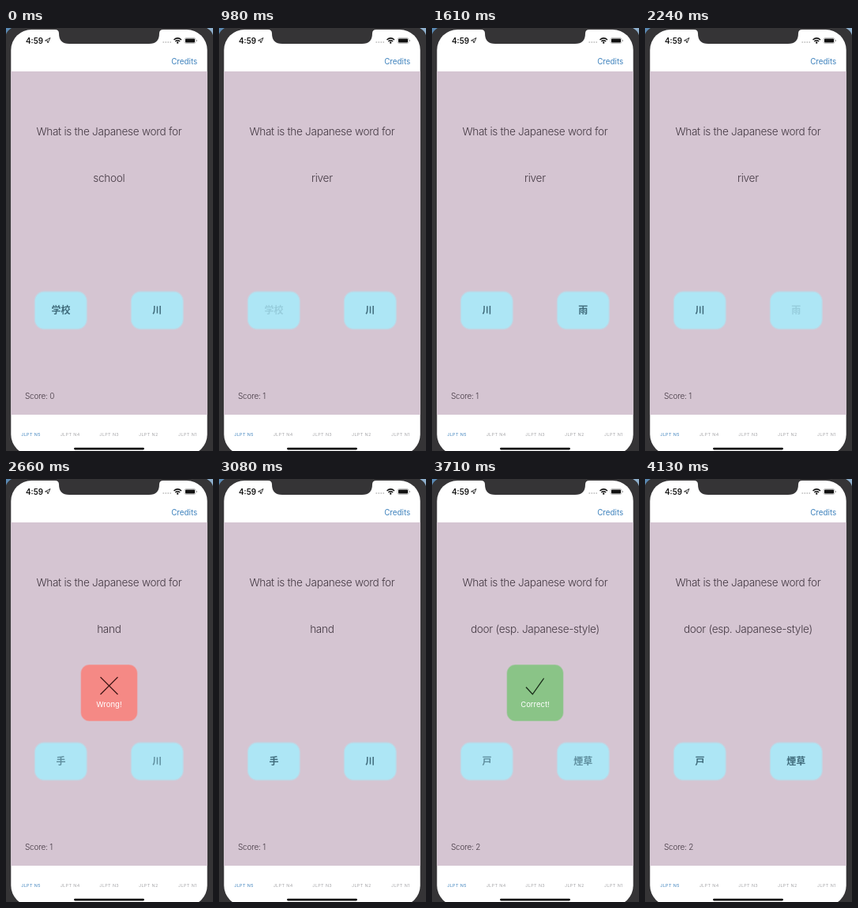
An HTML page for the animation above (4340 ms loop, 262 by 536 pixels).

```html
<!DOCTYPE html>
<html lang="ja">
<head>
<meta charset="utf-8">
<title>Japanese word quiz</title>
<style>
  html, body { margin: 0; width: 100%; height: 100%; overflow: hidden; background: #353436; }
  svg { display: block; width: 100vw; height: 100vh; }
  text { font-family: Inter, sans-serif; text-anchor: middle; }
  .prompt { font-size: 13.6px; font-weight: 300; letter-spacing: -.022em; fill: #443943; }
  .score { font-size: 10px; text-anchor: start; }
  .kanji { font: 700 12px "Noto Sans CJK JP", "Noto Sans CJK", sans-serif; fill: #3f6b7b; }
  .tab { font-size: 5.4px; letter-spacing: .4px; fill: #a5a5a8; }
  .tab.on { fill: #3e82bd; }
  .button { fill: #ade6f5; stroke: #c0d6e4; stroke-width: 1.3; }
  .mark { fill: none; stroke-width: 1.3; }
  .verdict { fill: #fff; font-size: 9.5px; }
</style>
</head>
<body>
<svg viewBox="0 0 262 536" preserveAspectRatio="none">
  <defs>
    <clipPath id="screen"><rect x="6.3" y="2" width="248.4" height="539" rx="26"/></clipPath>
  </defs>
  <rect width="262" height="536" fill="#353436"/>
  <path d="M0 0H7Q2 3 0 8Z" fill="#5b8ab4"/>
  <path d="M262 0H254Q260 3 262 9Z" fill="#8fb0cd"/>

  <g clip-path="url(#screen)">
    <rect width="262" height="541" fill="#fff"/>
    <rect y="55" width="262" height="435" fill="#d5c5d2"/>
    <path d="M62 0V2Q67 2 67 7Q67 20 80 20H181Q194 20 194 7Q194 2 199 2V0Z" fill="#353436"/>
    <text x="36" y="19.5" font-size="9.8" font-weight="600" fill="#111">4:59</text>
    <path d="M49.5 16L56 12.5L53 19L52.5 16Z" fill="none" stroke="#222" stroke-width=".9"/>
    <path d="M198.5 18H209" stroke="#bbb" stroke-width="1.5" stroke-dasharray="1.6 1.4"/>
    <g fill="none" stroke="#111" stroke-width="1.5">
      <path d="M212.5 15Q217.2 10.8 222 15M214.3 17Q217.2 14.5 220.2 17"/>
      <circle cx="217.2" cy="18.6" r=".5"/>
    </g>
    <rect x="226" y="12.5" width="14" height="7" rx="2" fill="none" stroke="#aaa" stroke-width=".7"/>
    <rect x="227" y="13.5" width="12" height="5" rx="1" fill="#111"/>
    <path d="M241.3 15V17" stroke="#999"/>
    <text x="225.7" y="45.5" font-size="9.8" fill="#3e82bd">Credits</text>

    <text class="prompt" x="130.4" y="136.4">What is the Japanese word for</text>
    <text class="prompt" id="word" x="130.4" y="195.4"></text>
    <text class="prompt score" id="score" x="24" y="469.5"></text>

    <rect class="button" x="36.4" y="334" width="65.8" height="47.5" rx="12"/>
    <rect class="button" x="158.4" y="334" width="65.8" height="47.5" rx="12"/>
    <g id="labels"></g>

    <g id="alert">
      <rect id="card" x="94.5" y="235" width="72" height="72" rx="11" stroke="#d5c5d2" stroke-opacity=".45" stroke-width="1.3"/>
      <path id="mark" class="mark"/>
      <text id="verdict" class="verdict" x="130.5" y="289"></text>
    </g>

    <g id="tabs"></g>
    <rect x="86" y="531.7" width="89" height="2.8" rx="1.4" fill="#111"/>
  </g>
</svg>
<script>
const LOOP = 4340, STEP = 70;

// Each round: when it starts, its content, when a button is tapped, and the alert shown on arrival.
const rounds = [
  { at: 0, word: 'school', options: ['学校', '川'], score: 0, tapAt: 840, tapped: 0 },
  { at: 980, word: 'river', options: ['川', '雨'], score: 1, tapAt: 2240, tapped: 1, alert: 'correct', closeAt: 1540 },
  { at: 2380, word: 'hand', options: ['手', '川'], score: 1, tapAt: 3360, tapped: 0, alert: 'wrong', closeAt: 2940 },
  { at: 3430, word: 'door (esp. Japanese-style)', options: ['戸', '煙草'], score: 2, alert: 'correct', closeAt: 4060 }
];
const alerts = {
  correct: { text: 'Correct!', fill: '#8ac487', ink: '#182b18', path: 'M119 263.8L127.3 272.8L141.6 252.5' },
  wrong: { text: 'Wrong!', fill: '#f58985', ink: '#421918', path: 'M119.5 251L141.5 273M141.5 251L119.5 273' }
};

const $ = id => document.getElementById(id);
const clamp = v => Math.max(0, Math.min(1, v));

function addText(parent, cls, x, y, text = '') {
  const el = document.createElementNS('http://www.w3.org/2000/svg', 'text');
  el.setAttribute('class', cls);
  el.setAttribute('x', x);
  el.setAttribute('y', y);
  el.textContent = text;
  return parent.appendChild(el);
}

[5, 4, 3, 2, 1].forEach((level, i) =>
  addText($('tabs'), i ? 'tab' : 'tab on', 31.5 + i * 49.6, 516.7, 'JLPT N' + level));

const labels = [69.5, 191.3].map(x => ({
  before: addText($('labels'), 'kanji', x, 362),
  now: addText($('labels'), 'kanji', x, 362)
}));

function drawAlert(round, t) {
  const alert = alerts[round.alert];
  if (!alert || t < round.at + STEP) {
    $('alert').style.opacity = 0;
    return 0;
  }
  const enter = 1 - (1 - clamp((t - round.at) / 210)) ** 2;
  const leave = clamp((t - round.closeAt + STEP) / 140);
  const scale = 1 + .48 * (1 - enter) - .08 * leave;
  const opacity = enter * (1 - leave);
  $('alert').style.opacity = opacity;
  $('alert').setAttribute('transform', `translate(130.5 271) scale(${scale}) translate(-130.5 -271)`);
  $('card').setAttribute('fill', alert.fill);
  $('mark').setAttribute('d', alert.path);
  $('mark').setAttribute('stroke', alert.ink);
  $('verdict').textContent = alert.text;
  return opacity;
}

function draw(t) {
  const index = rounds.findLastIndex(r => t >= r.at);
  const round = rounds[index], previous = rounds[index - 1];
  $('word').textContent = round.word;
  $('score').textContent = 'Score: ' + round.score;

  const dim = 1 - .3 * drawAlert(round, t);
  // Old labels fade out first, then the new ones fade in.
  const swap = previous ? clamp((t - round.at) / 140) : 1;
  const fadeIn = clamp(2 * swap - 1);
  const pressed = (r, side) => r.tapped === side && t >= r.tapAt ? .2 : 1;
  labels.forEach(({ before, now }, side) => {
    now.textContent = round.options[side];
    now.style.opacity = fadeIn * dim * pressed(round, side);
    before.textContent = previous ? previous.options[side] : '';
    before.style.opacity = previous ? (1 - swap) * pressed(previous, side) : 0;
  });
}

function tick() {
  draw(Math.floor(performance.now() % LOOP / STEP) * STEP);
  requestAnimationFrame(tick);
}
tick();
</script>
</body>
</html>
```
